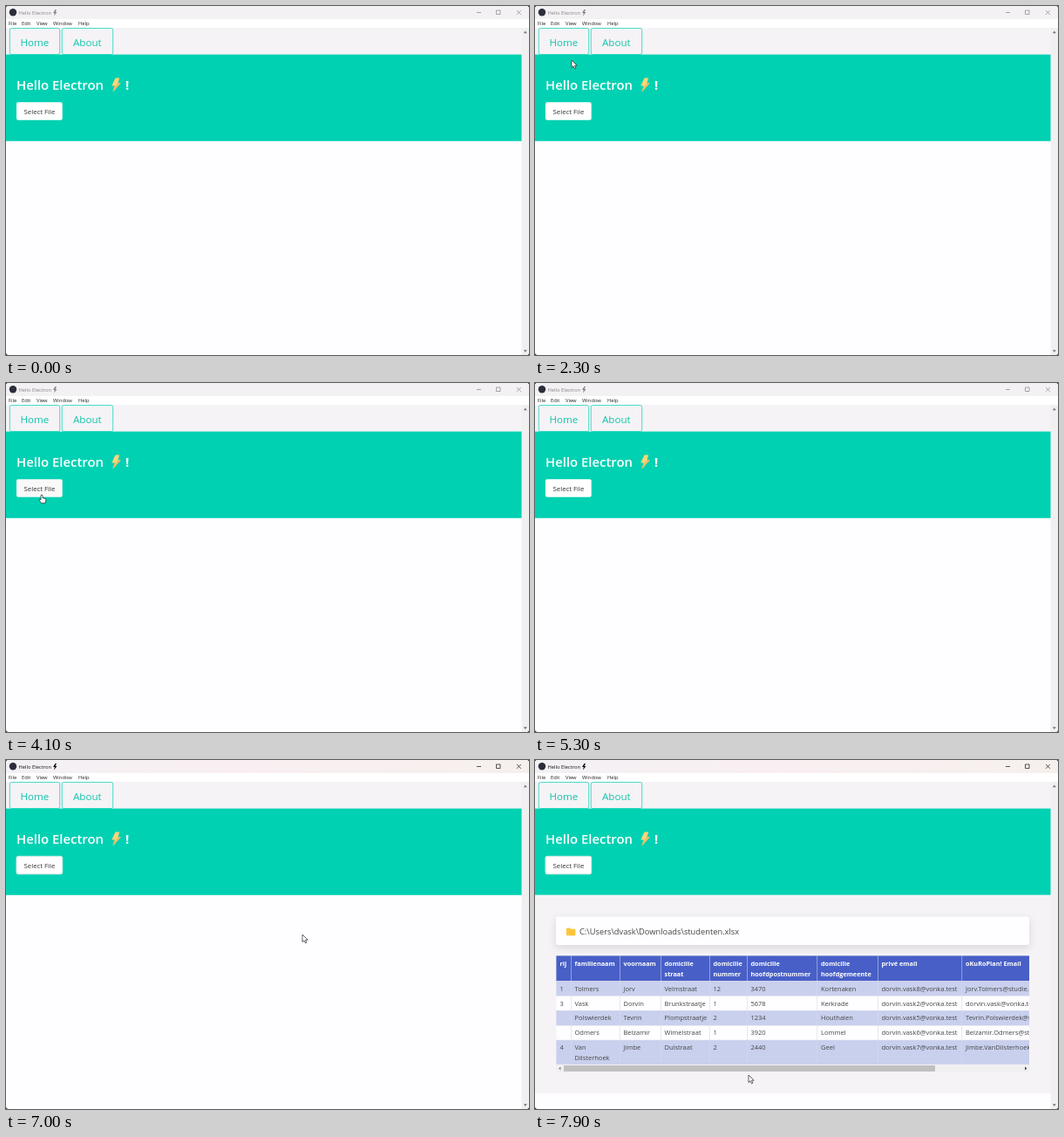
An HTML page that plays this animation: 600x400 px, repeating every 8000 ms.

```html
<!DOCTYPE html>
<html lang="en">
<head>
<meta charset="utf-8">
<title>Hello Electron</title>
<style>
html, body { margin: 0; width: 100%; height: 100%; overflow: hidden; background: #222; }
svg { display: block; width: 100vw; height: 100vh; font: 5.7px "Open Sans", sans-serif; }
text { fill: #222; white-space: pre; }
#bar text, #bar path { fill: #858287; }
#bar .ctl { fill: none; stroke: #858287; stroke-width: .7; }
.focused #bar text, .focused #bar path { fill: #111; }
.focused #bar .ctl { fill: none; stroke: #111; }
.focused #barBg { fill: url(#mica); }
.tab rect { fill: #f5f3f6; stroke: #00d1b2; stroke-width: .7; }
.tab text { fill: #10c4aa; font-size: 11.6px; }
.tab.hover rect { fill: #00d1b2; }
.tab.hover text { fill: #fff; }
#select text { font-size: 7.8px; fill: #363636; }
#select rect { fill: #fff; }
#select.hover rect { fill: #f9f9f9; }
.focused #select rect { stroke: #d5ebe7; stroke-width: 1; }
#dialog { filter: drop-shadow(0 9px 14px rgba(0,0,0,.45)); }
#dialog .dim { fill: #6b6b6b; }
#dialog .group { fill: #2b4a8b; font-size: 7.2px; }
.thin { fill: none; stroke: #666; stroke-width: .7; }
#table text { font-size: 7.5px; fill: #454545; }
#table .head { font-size: 7.3px; font-weight: 700; fill: #fff; }
</style>
</head>
<body>
<svg id="stage" viewBox="0 0 600 400">
  <defs>
    <linearGradient id="mica">
      <stop offset="0" stop-color="#f3f1f4"/><stop offset=".45" stop-color="#f9eff2"/><stop offset="1" stop-color="#f6f0ed"/>
    </linearGradient>
    <clipPath id="win"><rect width="600" height="400" rx="3"/></clipPath>
    <clipPath id="tableClip"><rect x="24.400" y="224" width="542.600" height="134"/></clipPath>
    <clipPath id="sideClip"><rect x="266" y="88" width="69.500" height="174"/></clipPath>
    <clipPath id="listClip"><rect x="344" y="88" width="256" height="174"/></clipPath>
  </defs>
  <g clip-path="url(#win)">
    <rect width="600" height="400" fill="#fefdff"/>
    <g id="bar">
      <rect id="barBg" width="600" height="15" fill="#f3f1f3"/>
      <circle cx="8" cy="7.300" r="4.200" style="fill:#2b2e3a"/>
      <text x="14.500" y="9.500" font-size="5.800">Hello Electron</text>
      <path d="M56.500 4 54 8h1.800L55 11.500 58.500 7h-1.900L58 4z"/>
      <path class="ctl" d="M540 7.500h5M562.500 5h4.500v4.500h-4.500zM586 5l4.800 4.800M590.800 5l-4.800 4.800"/>
    </g>
    <g id="menu" font-size="5.800"></g>
    <rect y="25" width="592" height="31" fill="#f5f3f6"/>
    <g id="home" class="tab"><rect x="4.300" y="25.500" width="57.400" height="30" rx="2"/><text x="16.500" y="45.500">Home</text></g>
    <g id="about" class="tab"><rect x="64.300" y="25.500" width="58.400" height="30" rx="2"/><text x="77" y="45.500">About</text></g>
    <rect y="55.600" width="592" height="99.200" fill="#00d1b2"/>
    <g font-size="14.900" font-weight="600">
      <text x="12" y="95.700" style="fill:#fff">Hello Electron</text>
      <text x="137" y="95.700" style="fill:#fff" font-weight="700">!</text>
    </g>
    <path d="M125.500 82.500h4.700l-1.800 6h3.200L122.500 98.500l2.200-7H121.300z" fill="#fbd679"/>
    <path d="M131.600 88.500 122.500 98.500l1.700-5.200 4-4.800z" fill="#f3bd66"/>
    <g id="select"><rect x="12" y="110.300" width="52.700" height="20.500" rx="2"/><text x="20.500" y="123.500">Select File</text></g>
    <g id="table"></g>
    <rect x="591.500" y="25" width="8.500" height="375" fill="#f1f0f1"/>
    <path d="M593.800 31.200h4l-2-2.600zM593.800 394.300h4l-2 2.600z" fill="#777"/>
    <g id="dialog"></g>
    <g id="cursor" fill="#fff" stroke="#222" stroke-width=".7">
      <path id="arrow" d="M0 0V8.600L2 6.800 3.400 9.900 4.900 9.200 3.500 6.200H6.200z"/>
      <path id="hand" d="M-1 .7Q0-.5 1 .7V3.800L4 4.400Q5 4.700 4.900 6L4.200 9.700H-.5L-2.900 6.300Q-3 5-2 5L-1 6z"/>
    </g>
  </g>
</svg>
<script>
const $ = id => document.getElementById(id);
const text = (x, y, s, attrs = '') => `<text x="${x}" y="${y}" ${attrs}>${s}</text>`;
const rect = (x, y, w, h, fill, attrs = '') => `<rect x="${x}" y="${y}" width="${w}" height="${h}" fill="${fill}" ${attrs}/>`;
const line = d => `<path class="thin" d="${d}"/>`;
const folder = (x, y, k = 1) =>
  `<path transform="translate(${x} ${y}) scale(${k})" d="M0 .8Q0 0 .8 0H3L4 1H7.200Q8 1 8 1.800V6Q8 6.800 7.200 6.800H.8Q0 6.800 0 6z" fill="#fcc53a"/>`;
const download = (x, y) =>
  `<path d="M${x} ${y}v5m-2.200-2 2.200 2.200 2.200-2.200M${x - 3} ${y + 7}h6" fill="none" stroke="#159a86" stroke-width="1.200"/>`;

$('menu').innerHTML = rect(0, 15, 600, 10, '#fff') +
  [['File', 3], ['Edit', 18], ['View', 35], ['Window', 54], ['Help', 83]].map(([s, x]) => text(x, 22.3, s)).join('');

function buildDialog() {
  const side = ['Desktop', 'Downloads', 'Omra (C:)', 'New Volume', 'Documents', 'Pictures', 'Music', 'Videos', 'TIW3'];
  const tints = ['#2997d8', '', '#555', '#555', '#7890a8', '#3c8edb', '#e8873a', '#7657c4', ''];
  const sideHtml = side.map((s, i) => {
    const y = 130.7 + i * 16.2;
    const icon = i === 1 ? download(286, y - 3.5) : i === 8 ? folder(282, y - 3)
      : i === 2 || i === 3 ? rect(282, y - 1, 8, 2.5, tints[i]) : rect(282, y - 3, 7.5, 6.5, tints[i], 'rx="1"');
    const pin = `<path d="M329 ${y + 2.5}l2-2m-1.300-1.300 2.600 2.600m-2-2.600 1.500-1.700 2 2-1.700 1.500" fill="#888" stroke="#888" stroke-width=".7"/>`;
    return icon + text(292.5, y + 2.2, s) + (i < 8 ? pin : '');
  }).join('');

  const entries = [
    ['Earlier this week'],
    ['S2IT_stagekalender_2022-2023 -SEM2 (2)....', '3/20/2023 1:51 PM'],
    ['S2IT_stagekalender_2022-2023 -SEM2 (1)....', '3/20/2023 1:48 PM'],
    ['Last week'],
    ['studenten.xlsx', '3/13/2023 4:15 PM'],
    ['publish (3)', '3/12/2023 12:28 PM'],
    ['Earlier this month'],
    ['S2IT_stagekalender_2022-2023 -SEM2.xlsx', '3/1/2023 8:43 PM'],
    ['publish (2)', '3/8/2023 2:04 PM'],
    ['CoverageReport (4)', '3/5/2023 12:28 PM'],
    ['Last month']
  ];
  const listHtml = entries.map(([name, date], i) => {
    const y = 112.3 + i * 15.1;
    if (!date) return line(`M349 ${y - 1}l2.500 2.500 2.500-2.500`) + text(356, y + 2.6, name, 'class="group"');
    const isFolder = /^(publish|Cov)/.test(name);
    return (isFolder ? folder(354.5, y - 3.3) : rect(355.5, y - 3, 6.5, 6.5, '#1f8a50')) +
      text(365, y + 2.1, name) + text(486, y + 2.1, date, 'class="dim"') +
      text(559.5, y + 2.1, isFolder ? 'File folder' : 'Tablovaro Cells', 'class="dim"');
  }).join('');

  return rect(265, 31, 350, 269, '#fff', 'rx="4" stroke="#999" stroke-width=".6"') +
    `<path d="M265.300 47V35q0-3.700 3.700-3.700H610V47z" fill="#f7eff3"/>` + text(269, 41, 'Open') +
    line('M307 58.500l2 2 2-2M323.500 63v-6m-2.500 2.500 2.500-2.500 2.500 2.500') +
    `<g opacity=".6">${line('M278 60h-6m2.500-2.500-2.500 2.500 2.500 2.500M289 60h6m-2.500-2.500 2.500 2.500-2.500 2.500')}</g>` +
    rect(333.5, 52, 280, 17, '#fff', 'stroke="#dcdcdc" stroke-width=".8"') + download(342.5, 56) +
    line('M350.500 58.500l1.500 1.700-1.500 1.700M392 58.500l1.500 1.700-1.500 1.700M597 59.500l2.500 2 2.500-2') + text(357, 62.2, 'Downloads') +
    rect(265.3, 73, 335, 16, '#f8f8f8') + text(273.5, 84, 'Organize') +
    '<path d="M300 81h4l-2 2.400z" fill="#444"/>' + text(319.5, 84, 'New folder') +
    rect(265.3, 89, 335, .6, '#e3e3e3') +
    `<g clip-path="url(#sideClip)">${rect(266, 90, 70, 16, '#d9d9d9')}${line('M272 96l2 2.200-2 2.200')}
      <circle cx="285.500" cy="98.500" r="3.600" fill="#1879cf"/>${text(292.5, 100.6, 'Dorvin - Personal')}
      ${rect(270, 114, 61, .7, '#ddd')}${sideHtml}</g>` +
    rect(338.3, 91, 2, 89, '#8c8c8c', 'rx="1"') + rect(343.8, 89, .6, 173, '#ddd') +
    `<g clip-path="url(#listClip)">${rect(352.5, 165.3, 260, 14, '#cce8ff', 'stroke="#8fcbf5" stroke-width=".7"')}
      ${text(361, 99, 'Name', 'class="dim"')}${text(486, 99, 'Date modified', 'class="dim"')}${text(559.5, 99, 'Type', 'class="dim"')}
      ${rect(482, 91, .6, 12, '#ddd')}${rect(556, 91, .6, 12, '#ddd')}${line('M517.500 92.500l2-1.700 2 1.700')}${listHtml}</g>` +
    `<path d="M265.300 262H610v37.700H269q-3.700 0-3.700-3.700z" fill="#f0f0f0"/>` + text(330, 274.3, 'File name:') +
    rect(360.5, 266.5, 250, 11.5, '#fff', 'stroke="#2c8d9c" stroke-width=".8"') + text(362, 274.4, 'studenten.xlsx');
}

function buildTable() {
  const columns = [24, 41, 97, 144, 200, 243, 323.5, 393, 489.5];
  const heads = ['rij', 'familienaam', 'voornaam', 'domicilie|straat', 'domicilie|nummer', 'domicilie|hoofdpostnummer',
    'domicilie|hoofdgemeente', 'privé email', 'oKuRoPlan! Email'];
  const mail = n => `dorvin.vask${n}@vonka.test`;
  const rows = [
    ['1', 'Tolmers', 'Jorv', 'Velmstraat', '12', '3470', 'Kortenaken', mail(8), 'Jorv.Tolmers@studie.test'],
    ['3', 'Vask', 'Dorvin', 'Brunkstraatje', '1', '5678', 'Kerkrade', mail(2), mail('')],
    ['', 'Polswierdek', 'Tevrin', 'Plompstraatje', '2', '1234', 'Houthalen', mail(5), 'Tevrin.Polswierdek@studie.test'],
    ['', 'Odmers', 'Belzamir', 'Wimelstraat', '1', '3920', 'Lommel', mail(6), 'Belzamir.Odmers@studie.test'],
    ['4', 'Van|Dilsterhoek', 'Jimbe', 'Dulstraat', '2', '2440', 'Geel', mail(7), 'Jimbe.VanDilsterhoek@studie.test']
  ];
  const cells = (row, y, attrs) => row.map((cell, c) =>
    cell.split('|').map((s, i) => text(columns[c] + 4.5, y + i * 12, s, attrs)).join('')).join('');
  const body = rows.map((row, i) => {
    const y = 253.3 + i * 16.9;
    return rect(24, y, 560, i === 4 ? 28 : 17, i % 2 ? '#fefdff' : '#c9d0ee') +
      rect(24, y, 560, .5, '#d7d9e5') + cells(row, y + 11.3);
  }).join('');
  const rules = columns.slice(1).map(x => rect(x, 224, .6, 29, '#c4cbea') + rect(x, 253, .6, 96, '#d7d9e5')).join('');
  return rect(0, 154.8, 592, 227.2, '#f5f3f6') +
    rect(24, 179.5, 543, 32.5, '#fefdff', 'rx="3" style="filter:drop-shadow(0 3px 5px rgba(10,10,10,.12))"') +
    folder(36, 192.5, 1.3) + text(51, 200, 'C:\\Users\\dvask\\Downloads\\studenten.xlsx', 'style="font-size:9.300px"') +
    `<g clip-path="url(#tableClip)">${rect(24, 224.4, 560, 29, '#485fc7')}${cells(heads, 236, 'class="head"')}${body}${rules}
      ${rect(24, 349, 543, 9, '#f1f0f1')}${rect(33, 350, 426, 7, '#c1c0c1')}
      <path d="M29.500 351.500v4l-2.400-2z" fill="#888"/><path d="M562 351.500v4l2.400-2z" fill="#444"/></g>`;
}

$('dialog').innerHTML = buildDialog();
$('table').innerHTML = buildTable();

// Pointer path: time, x, y. Equal neighbours are rests.
const path = [
  [100, 300, 338], [900, 200, 243], [1800, 60, 122], [2100, 34, 40], [2200, 38, 46], [2300, 42, 62],
  [2500, 45, 116], [2700, 44, 125], [2800, 48, 121], [3100, 70, 60], [3200, 77, 41.5], [3300, 77, 41.5],
  [3400, 75, 50], [3900, 40, 126], [4000, 40, 126], [4100, 41, 128], [4200, 41, 130], [4700, 41, 130],
  [4800, 126, 213], [4900, 126, 213], [5200, 201, 247], [6500, 398, 172], [6900, 398, 172],
  [7000, 340, 200], [7800, 324, 276], [7900, 245, 361]
];

function pointer(t) {
  const i = path.findIndex(p => p[0] >= t);
  if (i <= 0) return path[0].slice(1);
  const [a, b] = [path[i - 1], path[i]];
  const k = (t - a[0]) / (b[0] - a[0]);
  return [a[1] + (b[1] - a[1]) * k, a[2] + (b[2] - a[2]) * k];
}

const show = (id, on) => { $(id).style.display = on ? '' : 'none'; };

function draw(now) {
  const t = Math.floor(now % 8000 / 100) * 100;
  const [x, y] = pointer(t);
  const visible = t >= 100 && t < 5300 || t >= 6600;
  const dialogOpen = t >= 6600 && t < 6800;
  const inside = (l, top, r, b) => visible && !dialogOpen && x >= l && x <= r && y >= top && y <= b;
  const hovers = { home: inside(4, 25, 62, 56), about: inside(64, 25, 123, 56), select: inside(12, 110, 65, 131) };
  for (const id in hovers) $(id).classList.toggle('hover', hovers[id]);
  const hand = Object.values(hovers).some(Boolean);
  $('stage').classList.toggle('focused', t >= 4600 && t < 4800 || t >= 7000);
  show('dialog', dialogOpen);
  $('dialog').style.opacity = t === 6700 ? .5 : 1;
  show('table', t >= 7200);
  show('cursor', visible);
  show('hand', hand);
  show('arrow', !hand);
  $('cursor').setAttribute('transform', `translate(${x} ${y})`);
}

const start = performance.now();
(function tick() {
  draw(performance.now() - start);
  requestAnimationFrame(tick);
})();
</script>
</body>
</html>
```
